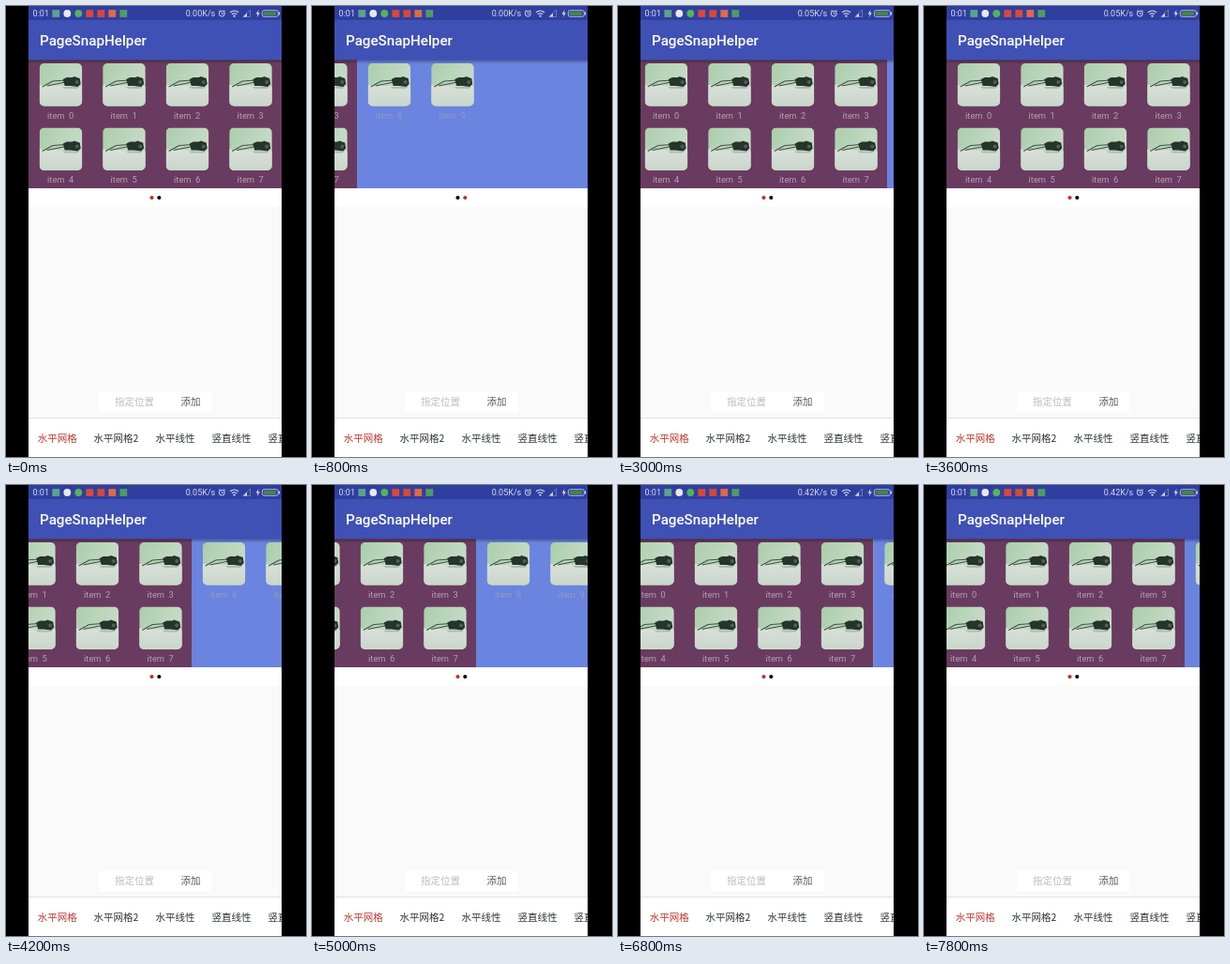
Recreate the animation shown at these times as an HTML page. Size 320 by 480 pixels, loop 8000 ms.

```html
<!DOCTYPE html>
<html lang="zh">
<head>
<meta charset="utf-8">
<title>PageSnapHelper</title>
<style>
  html, body { margin: 0; width: 100%; height: 100%; overflow: hidden; background: #000; }
  svg { display: block; width: 320px; height: 480px; }
  text { font-family: Roboto, "Noto Sans CJK SC", "Noto Sans CJK", sans-serif; white-space: pre; }
  .status { font-size: 9px; fill: #d5d9ee; }
  .title { font-size: 15.2px; font-weight: 500; fill: #fff; }
  .label { font-size: 9.3px; text-anchor: middle; fill: #b5a0b0; }
  .pale { fill: #929cc0; }
  .cjk { font-size: 10.5px; font-family: "Noto Sans CJK SC", "Noto Sans CJK", Roboto, sans-serif; }
  .tab { font-weight: 500; fill: #2c3430; }
  .tab.on { fill: #bd3530; }
</style>
</head>
<body>
<svg viewBox="0 0 320 480">
  <defs>
    <clipPath id="screen"><path d="M24 0h270v480h-270z"/></clipPath>
    <clipPath id="pager"><path d="M24 57h270v137h-270z"/></clipPath>
    <clipPath id="rounded"><rect width="45.4" height="45.4" rx="5"/></clipPath>
    <linearGradient id="wall" x2="1" y2=".5">
      <stop stop-color="#a9ceaa"/><stop offset="1" stop-color="#cbdccb"/>
    </linearGradient>
    <linearGradient id="table" x2="0" y2="1">
      <stop stop-color="#d9e0d9"/><stop offset="1" stop-color="#c9d6cc"/>
    </linearGradient>
    <linearGradient id="shadow" x2="0" y2="1">
      <stop stop-opacity=".3"/><stop offset="1" stop-opacity="0"/>
    </linearGradient>
    <g id="photo" clip-path="url(#rounded)">
      <path fill="url(#wall)" d="M0 0h46v46h-46z"/>
      <path fill="url(#table)" d="M0 23L46 25V46H0z"/>
      <path fill="none" stroke="#3f5145" stroke-width="1.1" d="M3 25L14 19L28 18M8 24L28 20"/>
      <path fill="#aebdaf" d="M24 25h19l-3 2h-13z"/>
      <path fill="#26342c" d="M25 17L29 15H35L37 14L43 16L44 22L41 25L33 24L27 24z"/>
      <circle cx="40" cy="20" r="2" fill="#4d6154"/>
    </g>
  </defs>

  <g clip-path="url(#screen)">
    <path fill="#fafafa" d="M24 0h270v480h-270z"/>
    <g clip-path="url(#pager)"><g id="pages">
      <path fill="#693b60" d="M24 57h270v137h-270z"/>
      <path fill="#6a84df" d="M294 57h270v137h-270z"/>
    </g></g>

    <path fill="#303f9f" d="M24 0h270v15h-270z"/>
    <path fill="#3f51b5" d="M24 15h270v42.5h-270z"/>
    <path fill="url(#shadow)" d="M24 57.5h270v4h-270z"/>
    <text class="status" x="28.6" y="11.3">0:01</text>
    <g id="badges"></g>
    <text class="status" id="speed" x="191.7" y="11.3"></text>
    <g fill="none" stroke="#d5d9ee">
      <circle cx="230.3" cy="8.2" r="2.9"/>
      <path d="M230.3 6.5v2h1.5M226.8 5.8l1.8-1.6M233.8 5.8l-1.8-1.6" stroke-width=".8"/>
      <path d="M239 6.8q4.5-3.6 9 0M240.8 8.8q2.7-2.1 5.4 0" stroke-width="1.2"/>
      <path d="M253 11.5h7.5v-7.5z" stroke-width=".6" opacity=".6"/>
      <rect x="273.3" y="4.7" width="17" height="6.6" rx="2" stroke-width=".8"/>
    </g>
    <g fill="#d5d9ee">
      <circle cx="243.5" cy="10.7" r="1.1"/>
      <path d="M253 11.5h4v-4zM269.5 4l-3 4.4h2l-.8 3.6 3.2-4.7h-2z"/>
      <path d="M291 6.5h1v3h-1z"/>
    </g>
    <rect x="274.6" y="6" width="13.5" height="4" rx="1" fill="#45863f"/>
    <text class="title" x="36" y="42.3">PageSnapHelper</text>

    <path fill="#fff" d="M24 194h270v20h-270z"/>
    <circle class="dot" cx="155.5" cy="204" r="2.1"/>
    <circle class="dot" cx="163.3" cy="204" r="2.1"/>

    <path fill="#fff" d="M99.5 410.5h120v22h-120z"/>
    <text class="cjk" x="116" y="425.4" fill="#bdbdbd">指定位置</text>
    <text class="cjk" x="186.5" y="425.4" fill="#555c58">添加</text>

    <path fill="#e2e2e2" d="M24 438h270v1.2h-270z"/>
    <path fill="#fff" d="M24 439.2h270v41h-270z"/>
    <g id="tabs"></g>
  </g>
</svg>
<script>
const LOOP = 8000, TICK = 200, PAGE = 270;
const find = id => document.getElementById(id);

function add(parent, tag, attrs, text = '') {
  const node = document.createElementNS('http://www.w3.org/2000/svg', tag);
  for (const key in attrs) node.setAttribute(key, attrs[key]);
  node.textContent = text;
  parent.append(node);
  return node;
}

const pages = find('pages');
for (let i = 0; i < 10; i++) {
  const second = i >= 8, slot = i % 8;
  const x = 35.7 + (slot % 4) * 67.5 + (second ? PAGE : 0);
  const y = 61 + Math.floor(slot / 4) * 68.5;
  add(pages, 'use', { href: '#photo', transform: `translate(${x} ${y})` });
  add(pages, 'text', { class: second ? 'label pale' : 'label', x: x + 22.5, y: y + 58.8 }, `item  ${i}`);
}

['#58a58d', '#e8e8ec', '#55b35a', '#d9483b', '#d64a35', '#e06a45', '#4f9c62'].forEach((fill, i) => {
  const x = 53.3 + i * 12;
  if (i === 1 || i === 2) add(find('badges'), 'circle', { cx: x, cy: 8, r: 3.9, fill });
  else add(find('badges'), 'rect', { x: x - 3.9, y: 4.1, width: 7.8, height: 7.8, fill });
});

[[33.7, '水平网格'], [93.5, '水平网格2'], [159.5, '水平线性'], [219.5, '竖直线性'], [279.5, '竖直网格']]
  .forEach(([x, name], i) => add(find('tabs'), 'text', { class: i ? 'cjk tab' : 'cjk tab on', x, y: 463.8 }, name));

// Scroll offset as [time, px]
const scroll = [
  [0, 0], [200, 12], [800, 246], [1200, 270], [2200, 270], [2800, 34], [3000, 7], [3200, 0],
  [3800, 0], [4200, 96], [4600, 128], [5000, 119], [6200, 61], [7200, 0], [7600, 0], [7800, 16], [8000, 40]
];

function offsetAt(t) {
  const i = scroll.findIndex(([time]) => time > t);
  const [t0, a] = scroll[i - 1], [t1, b] = scroll[i];
  const p = (t - t0) / (t1 - t0);
  return a + (b - a) * p * p * (3 - 2 * p);
}

const dots = document.querySelectorAll('.dot');

function draw(now) {
  const t = Math.floor((now % LOOP) / TICK) * TICK;
  const offset = offsetAt(t);
  pages.setAttribute('transform', `translate(${-offset} 0)`);
  const current = Math.round(offset / PAGE);
  dots.forEach((dot, i) => dot.setAttribute('fill', i === current ? '#b8322c' : '#080808'));
  find('speed').textContent = t < 1400 ? '0.00K/s' : t < 5400 ? '0.05K/s' : '0.42K/s';
}

function frame() {
  draw(performance.now());
  requestAnimationFrame(frame);
}
frame();
</script>
</body>
</html>
```
